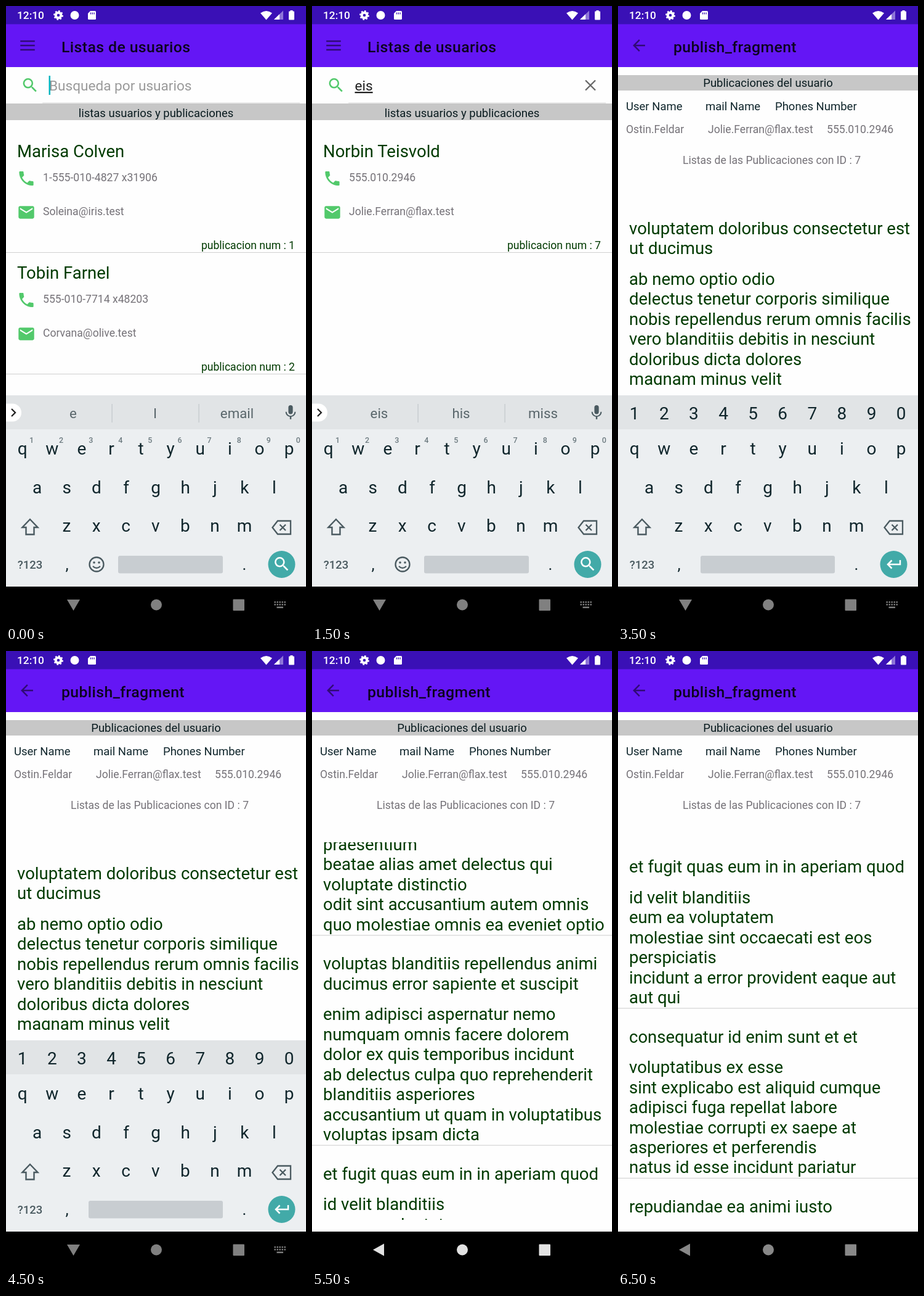
An HTML page for the animation above (7 s loop, 487 by 1000 pixels).

```html
<!DOCTYPE html>
<html lang="es">
<head>
<meta charset="utf-8">
<title>Listas de usuarios</title>
<style>
html, body { margin: 0; width: 100%; height: 100%; overflow: hidden; background: #fefefe; }
svg { display: block; width: 487px; height: 1000px; font-family: Roboto, sans-serif; }
text { white-space: pre; }
</style>
</head>
<body>
<svg id="stage" viewBox="0 0 487 1000"></svg>
<script>
const STEP = 500, STEPS = 14;
const stage = document.getElementById('stage');
const GREEN = '#003a00', GREY = '#757278', INK = '#10262c', KEY = '#4a5a60', LEAF = '#52c96b';
const BODY = 17.6, LABEL = 18.5, HEADLINE = 27.53, LINE = 32.46;

const users = [
  { name: 'Marisa Colven', phone: '1-555-010-4827 x31906', mail: 'Soleina@iris.test', id: 1 },
  { name: 'Tobin Farnel', phone: '555-010-7714 x48203', mail: 'Corvana@olive.test', id: 2 },
  { name: 'Norbin Teisvold', phone: '555.010.2946', mail: 'Jolie.Ferran@flax.test', id: 7 }
];

// Each post: title lines, then body lines
const posts = [
  ['voluptatem doloribus consectetur est|ut ducimus',
   'ab nemo optio odio|delectus tenetur corporis similique|nobis repellendus rerum omnis facilis|vero blanditiis debitis in nesciunt|doloribus dicta dolores|magnam minus velit'],
  ['beatae enim quia vel',
   'enim aspernatur illo distinctio quae|praesentium|beatae alias amet delectus qui|voluptate distinctio|odit sint accusantium autem omnis|quo molestiae omnis ea eveniet optio'],
  ['voluptas blanditiis repellendus animi|ducimus error sapiente et suscipit',
   'enim adipisci aspernatur nemo|numquam omnis facere dolorem|dolor ex quis temporibus incidunt|ab delectus culpa quo reprehenderit|blanditiis asperiores|accusantium ut quam in voluptatibus|voluptas ipsam dicta'],
  ['et fugit quas eum in in aperiam quod',
   'id velit blanditiis|eum ea voluptatem|molestiae sint occaecati est eos|perspiciatis|incidunt a error provident eaque aut|aut qui'],
  ['consequatur id enim sunt et et',
   'voluptatibus ex esse|sint explicabo est aliquid cumque|adipisci fuga repellat labore|molestiae corrupti ex saepe at|asperiores et perferendis|natus id esse incidunt pariatur'],
  ['repudiandae ea animi iusto',
   'officia veritatis tenetur vero qui|itaque']
];

const icons = {
  phone: 'M6.62 10.79c1.44 2.83 3.76 5.14 6.59 6.59l2.2-2.2c.27-.27.67-.36 1.02-.24 1.12.37 2.33.57 3.57.57.55 0 1 .45 1 1V20c0 .55-.45 1-1 1C10.61 21 3 13.39 3 4c0-.55.45-1 1-1h3.5c.55 0 1 .45 1 1 0 1.25.2 2.45.57 3.57.11.35.03.74-.25 1.02z',
  mail: 'M20 4H4c-1.1 0-2 .9-2 2v12c0 1.1.9 2 2 2h16c1.1 0 2-.9 2-2V6c0-1.1-.9-2-2-2zm0 4l-8 5-8-5V6l8 5 8-5z',
  search: 'M15.5 14h-.79l-.28-.27A6.47 6.47 0 0 0 16 9.5 6.5 6.5 0 1 0 9.5 16c1.61 0 3.09-.59 4.23-1.57l.27.28v.79l5 4.99L20.49 19zm-6 0a4.5 4.5 0 1 1 0-9 4.5 4.5 0 0 1 0 9z',
  back: 'M20 11H7.83l5.59-5.59L12 4l-8 8 8 8 1.41-1.41L7.83 13H20z',
  menu: 'M2.5 5.4h19v2h-19zM2.5 11h19v2h-19zM2.5 16.6h19v2h-19z',
  mic: 'M12 14a3 3 0 0 0 3-3V5a3 3 0 0 0-6 0v6a3 3 0 0 0 3 3zm5.3-3a5.3 5.3 0 0 1-10.6 0H5a7 7 0 0 0 6 6.7V21h2v-3.3A7 7 0 0 0 19 11z'
};

const text = (x, y, s, size, fill, more = '') =>
  `<text x="${x}" y="${y}" font-size="${size}" fill="${fill}" ${more}>${s}</text>`;
const mid = 'text-anchor="middle" ', medium = 'font-weight="500" ';
const rect = (x, y, w, h, fill, more = '') =>
  `<rect x="${x}" y="${y}" width="${w}" height="${h}" fill="${fill}" ${more}/>`;
const disc = (x, y, r, fill) => `<circle cx="${x}" cy="${y}" r="${r}" fill="${fill}"/>`;
const shape = (d, fill, more = '') => `<path d="${d}" fill="${fill}" ${more}/>`;
const line = (d, stroke, width) => `<path d="${d}" fill="none" stroke="${stroke}" stroke-width="${width}"/>`;
const icon = (name, x, y, scale, fill, more = '') =>
  shape(icons[name], fill, `transform="translate(${x} ${y}) scale(${scale}) translate(-12 -12)" ${more}`);
const ring = (x, y, r, stroke, width, more = '') =>
  `<circle cx="${x}" cy="${y}" r="${r}" fill="none" stroke="${stroke}" stroke-width="${width}" ${more}/>`;

function header(title, iconName) {
  return rect(0, 0, 487, 30, '#3a10b6') + rect(0, 29.5, 487, 69.5, '#6416f5')
    + text(18, 21, '12:10', 17.3, '#fff', medium)
    + ring(85, 15, 4.3, '#fff', 4) + ring(85, 15, 6.6, '#fff', 2.6, 'pathLength="16" stroke-dasharray="1 1"')
    + disc(111.5, 15, 7, '#fff')
    + shape('M137 8h7.5q1.5 0 1.5 1.5v11q0 1.5-1.5 1.5h-10q-1.5 0-1.5-1.5V12z', '#fff')
    + line('M137.5 10.5v3m2.8-3v3m2.8-3v3', '#3a10b6', 1.3)
    + shape('M413 11.5Q422.5 4.5 432 11.5L422.5 22.5z', '#fff')
    + shape('M435 22L450 7.5V22z', '#8e75d8') + shape('M435 22L444 13.3V22z', '#fff')
    + rect(459, 8.5, 9, 14, '#fff', 'rx="1"') + rect(461.5, 7, 4, 3, '#fff')
    + icon(iconName, iconName === 'menu' ? 35 : 34, 64, 1.24, '#000', 'opacity=".52"')
    + text(90, 75, title, 24.8, '#0c0420', medium + 'letter-spacing=".39"');
}

function userRow(user, i) {
  const y = i * 197;
  return text(18, 245 + y, user.name, HEADLINE, GREEN)
    + icon('phone', 33, 279.5 + y, 1.29, LEAF) + text(60, 284 + y, user.phone, BODY, GREY)
    + icon('mail', 33, 334.5 + y, 1.27, LEAF) + text(60, 339 + y, user.mail, BODY, GREY)
    + text(469, 394 + y, 'publicacion num : ' + user.id, BODY, GREEN, 'text-anchor="end"')
    + rect(0, 399 + y, 487, 1, '#d0d0d0');
}

function userList(query) {
  const found = query.length > 1 ? users.filter(u => u.name.includes(query)) : users.slice(0, 2);
  return header('Listas de usuarios', 'menu')
    + icon('search', 39, 128.5, 1.27, LEAF)
    + (query
      ? text(69.5, 137, query, 22.6, '#202020', 'text-decoration="underline"')
        + line('M444 120.5l16 16m0-16l-16 16', '#666', 2.3)
      : text(70, 137, 'Busqueda por usuarios', 22.6, '#9a9a9a') + rect(69.5, 113, 2.5, 31, '#00b5c0'))
    + rect(59, 156.5, 418, 1, '#d8d8d8') + rect(0, 158, 487, 27, '#c7c7c7')
    + text(243.5, 180, 'listas usuarios y publicaciones', LABEL, '#0a1c20', mid)
    + found.map(userRow).join('');
}

function fragmentTop() {
  const user = users[2];
  return header('publish_fragment', 'back') + rect(0, 112, 487, 25, '#c7c7c7')
    + text(243.5, 131, 'Publicaciones del usuario', LABEL, '#0a1c20', mid)
    + text(13, 169, 'User Name', LABEL, INK) + text(142, 169, 'mail Name', LABEL, INK)
    + text(255, 169, 'Phones Number', LABEL, INK)
    + text(13, 206, 'Ostin.Feldar', BODY, GREY) + text(146, 206, user.mail, BODY, GREY)
    + text(339, 206, user.phone, BODY, GREY)
    + text(249.5, 255.5, 'Listas de las Publicaciones con ID : 7', BODY, GREY, mid);
}

function postList(scroll, bottom) {
  let y = 370 - scroll, out = '';
  const lines = block => {
    for (const s of block.split('|')) {
      out += text(18, y, s, HEADLINE, GREEN);
      y += LINE;
    }
  };
  for (const [title, body] of posts) {
    lines(title);
    y += 17.1;
    lines(body);
    out += rect(0, y - 25, 487, 1.2, '#d4d4d4');
    y += 31.1;
  }
  return `<clipPath id="list"><rect y="310" width="487" height="${bottom - 310}"/></clipPath><g clip-path="url(#list)">${out}</g>`;
}

function strip(words) {
  return shape('M0 644.5h10.5a14.5 14.5 0 0 1 0 29H0z', '#fff')
    + line('M9 653l6 6l-6 6', '#222', 2.3) + icon('mic', 462, 659, 1.2, KEY)
    + words.map((w, i) => text(109 + 133 * i, 668, w, 22.3, '#59666b', mid)).join('')
    + (words.length ? rect(171.5, 645, 1.2, 30, '#c2c7c9') + rect(312.5, 645, 1.2, 30, '#c2c7c9') : '');
}

function keyboard(words) {
  const row = (keys, x, y) =>
    [...keys].map((k, i) => text(x + 48.1 * i, y, k, 28, INK, mid)).join('');
  const digits = '1234567890', spaceX = words ? 182 : 134;
  let out = rect(0, 631, 487, 310, '#eceff1') + rect(0, 631, 487, 55, '#e1e4e6')
    + row('qwertyuiop', 26.7, 727) + row('asdfghjkl', 50.7, 789.5) + row('zxcvbnm', 98.5, 852)
    + line('M39 832l12.5 13h-6v11.5h-13V845h-6z', KEY, 2.4)
    + line('M441 834.5h21v21.5h-21l-8.5-10.75zM444.5 840.5l9.5 9.5m0-9.5l-9.5 9.5', KEY, 2.3)
    + text(39, 912, '?123', 18.5, KEY, mid + medium)
    + text(99, 914, ',', 26, INK, mid) + text(387, 914, '.', 26, INK, mid)
    + rect(spaceX, 891, 352 - spaceX, 28.5, '#c8cdd1', 'rx="3"')
    + disc(447.5, 905, 22, '#42aaa8');
  if (!words) {
    return out + row(digits, 26.7, 670)
      + line('M458 898v7h-20m6.5-6.5l-6.5 6.5l6.5 6.5', '#fff', 2.5);
  }
  out += [...digits].map((d, i) => text(41.5 + 48.1 * i, 707.5, d, 12.5, '#6d7b80', mid + medium)).join('');
  return out + strip(words) + icon('search', 447.5, 904.5, 1.27, '#fff')
    + ring(147, 905, 11.5, KEY, 2.3) + disc(143, 902, 1.8, KEY) + disc(151, 902, 1.8, KEY)
    + line('M141 908q6 6 12 0', KEY, 2.2);
}

function navBar(typing, color) {
  let out = rect(0, 941, 487, 59, '#000') + disc(244, 970.5, 9, color) + rect(368.5, 961.5, 18.5, 18.5, color, 'rx="1"')
    + shape(typing ? 'M99 962h21l-10.5 18z' : 'M117 960.5v20L99 970.5z', color);
  if (!typing) return out;
  for (let r = 0; r < 2; r++)
    for (let c = 0; c < 5; c++) out += rect(435.5 + 4 * c, 965 + 4 * r, 2.4, 2.4, color);
  return out + rect(439.5, 973.5, 10.5, 2.4, color);
}

const spinner = (start, sweep) => ring(244, 365, 22.3, '#00c5c8', 5,
  `pathLength="360" stroke-dasharray="${sweep} 360" transform="rotate(${start} 244 365)"`);

const toast = opacity => `<g opacity="${opacity}">` + rect(32, 832, 424, 78, '#eeeeee', 'rx="39"')
  + text(75, 867, 'id desde render viewHolders call now to', BODY, '#303030')
  + text(75, 887.5, 'rest api  7', BODY, '#303030') + '</g>';

function draw(step) {
  const typing = step < 10;
  const words = step < 2 ? ['e', 'I', 'email'] : step < 4 ? ['eis', 'his', 'miss'] : step < 7 ? [] : null;
  const scroll = typing ? 0 : [392.5, 437, 735, 934.5][step - 10];
  const navColor = typing ? '#808080' : ['#fff', '#e2e2e2', '#aaa', '#888'][step - 10];
  const page = step < 4 ? userList(['', 'e', 'eis', 'eis'][step])
    : fragmentTop() + (step < 6 ? spinner(...[[-60, 70], [-142, 255]][step - 4])
      : postList(scroll, typing ? 614 : 922));
  stage.innerHTML = rect(0, 0, 487, 1000, '#fefefe') + page
    + (typing ? keyboard(words) : '') + navBar(typing, navColor)
    + (step === 4 ? toast(0.95) : step === 5 ? toast(0.27) : '');
}

let shown = -1;
function tick() {
  const step = Math.floor(performance.now() / STEP) % STEPS;
  if (step !== shown) draw(shown = step);
  requestAnimationFrame(tick);
}
tick();
</script>
</body>
</html>
```
